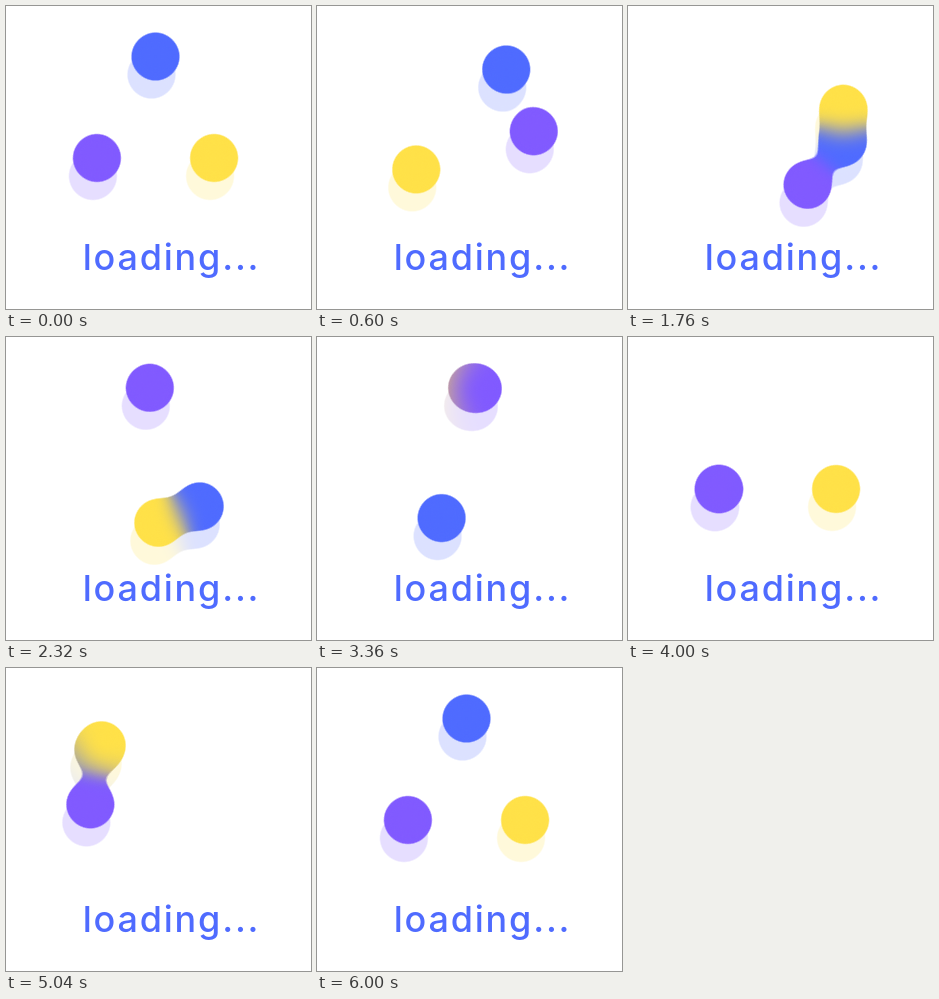
An HTML page for the animation above (6.04 s loop, 305 px wide and 303 px high).

```html
<!DOCTYPE html>
<html lang="en">
<head>
<meta charset="utf-8">
<title>Loading</title>
<style>
  html, body { margin: 0; width: 100%; height: 100%; overflow: hidden; background: #fff; }
  svg { display: block; width: 305px; height: 303px; }

  /* 151 ticks of 40 ms; 150 ticks make the full turns, so the last tick repeats the start pose */
  .ball {
    transform-origin: 149.5px 118.2px;
    animation: orbit 6040ms steps(151, end) -1ms infinite;
  }
  @keyframes orbit {
    from { transform: rotate(var(--from)); }
    to { transform: rotate(calc(var(--from) + var(--turns) * 362.4deg)); }
  }
  .blue   { --from: 0deg;   --turns: 1; fill: #4f6bff; }
  .yellow { --from: 120deg; --turns: 3; fill: #ffe148; }
  .purple { --from: 240deg; --turns: 6; fill: #815aff; }

  text {
    font: 500 36px Inter, Roboto, sans-serif;
    letter-spacing: 1.8px;
    fill: #4f6bff;
  }
</style>
</head>
<body>
<svg viewBox="0 0 305 303">
  <defs>
    <filter id="goo" filterUnits="userSpaceOnUse" x="0" y="0" width="305" height="303"
            color-interpolation-filters="sRGB">
      <feGaussianBlur in="SourceGraphic" stdDeviation="10"/>
      <feColorMatrix values="1 0 0 0 0  0 1 0 0 0  0 0 1 0 0  0 0 0 18 -7" result="blob"/>
      <feColorMatrix in="blob" values="1 0 0 0 0  0 1 0 0 0  0 0 1 0 0  0 0 0 .2 0"/>
      <feOffset dx="-4" dy="18" result="shadow"/>
      <feMerge>
        <feMergeNode in="shadow"/>
        <feMergeNode in="blob"/>
      </feMerge>
    </filter>
  </defs>
  <g filter="url(#goo)">
    <circle class="ball blue" cx="149.5" cy="50.6" r="24"/>
    <circle class="ball yellow" cx="149.5" cy="50.6" r="24"/>
    <circle class="ball purple" cx="149.5" cy="50.6" r="24"/>
  </g>
  <text x="76.7" y="264">loading...</text>
</svg>
</body>
</html>
```
